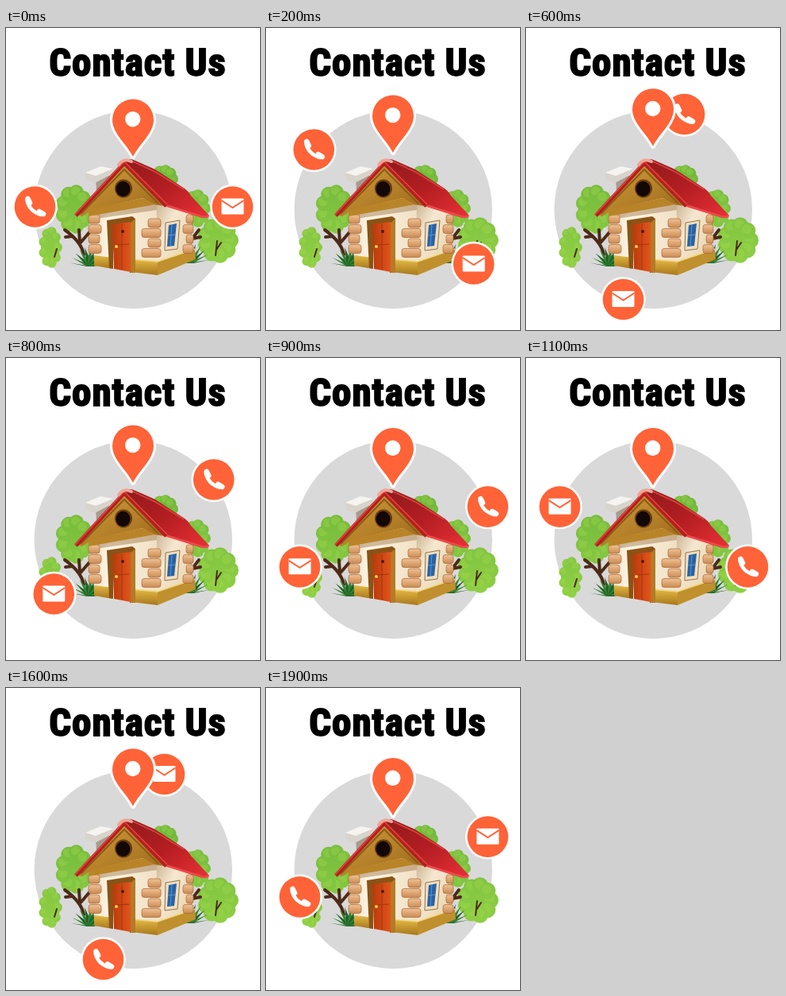
Animation, 320 px wide and 380 px high, one loop 2 s. Source, as an HTML page:

```html
<!DOCTYPE html>
<html lang="en">
<head>
<meta charset="utf-8">
<title>Contact Us</title>
<style>
  html, body { margin: 0; width: 100%; height: 100%; overflow: hidden; background: #fff; }
  svg { display: block; width: 320px; height: 380px; }
  #title {
    font: 900 49px "Roboto Condensed", Roboto, "Open Sans", sans-serif;
    font-stretch: condensed;
    letter-spacing: 1px;
    stroke: #000;
    stroke-width: 1.8px;
  }
</style>
</head>
<body>
<svg viewBox="0 0 320 380">
  <defs>
    <linearGradient id="roof" x1="0" y1="0" x2="1" y2="1">
      <stop offset="0" stop-color="#8f1a1c"/><stop offset=".5" stop-color="#b41e22"/><stop offset="1" stop-color="#ea3137"/>
    </linearGradient>
    <linearGradient id="gable" x1="0" y1="0" x2="1" y2="1">
      <stop offset="0" stop-color="#d3a03c"/><stop offset="1" stop-color="#9a6519"/>
    </linearGradient>
    <linearGradient id="front" x1="0" y1="0" x2="1" y2="0">
      <stop offset="0" stop-color="#e9dcc6"/><stop offset=".3" stop-color="#fff6e3"/><stop offset="1" stop-color="#f0dfc4"/>
    </linearGradient>
    <linearGradient id="side" x1="0" y1="0" x2="1" y2="1">
      <stop offset="0" stop-color="#c9b190"/><stop offset=".35" stop-color="#f5e8d0"/><stop offset="1" stop-color="#e6cfa6"/>
    </linearGradient>
    <linearGradient id="door" x1="0" y1="0" x2="1" y2="0">
      <stop offset="0" stop-color="#b83a0b"/><stop offset="1" stop-color="#e2541c"/>
    </linearGradient>
    <linearGradient id="base" x1="0" y1="0" x2="0" y2="1">
      <stop offset="0" stop-color="#e3b945"/><stop offset="1" stop-color="#a8771c"/>
    </linearGradient>
    <linearGradient id="brick" x1="0" y1="0" x2="0" y2="1">
      <stop offset="0" stop-color="#f0c294"/><stop offset="1" stop-color="#cb8a52"/>
    </linearGradient>
    <linearGradient id="leaf" gradientUnits="userSpaceOnUse" x1="0" y1="180" x2="0" y2="300">
      <stop offset="0" stop-color="#72b83c"/><stop offset="1" stop-color="#90d044"/>
    </linearGradient>
  </defs>

  <text id="title" x="166" y="59.500" text-anchor="middle">Contact Us</text>
  <circle cx="160.3" cy="228.5" r="124.7" fill="#d9d9d9"/>

  <g id="trees" fill="url(#leaf)"></g>
  <g fill="none" stroke="#4d2a18" stroke-linecap="round" stroke-linejoin="round">
    <path d="M98 285Q95 269 74 254M93 270L92 254M84 262L75 263M94 270L106 256" stroke-width="4"/>
    <path d="M228 283Q232 267 243 254M232 269L231 253M235 265L245 263" stroke-width="4"/>
    <path d="M264 286L266 268M265 279L271 270M61 288L64 278" stroke-width="2"/>
  </g>
  <g id="grass"></g>

  <!-- walls -->
  <path d="M104 225L148 190L191 220L190 310L112 299Z" fill="url(#front)"/>
  <path d="M190 218L233 233L234 290L189 305Z" fill="url(#side)"/>
  <path d="M104 232L190 220V229L106 241Z" fill="#8a6238" opacity=".4"/>
  <path d="M111 286L134 289V303L111 299Z" fill="url(#base)"/>
  <path d="M158 291L191 294V311L158 307Z" fill="url(#base)"/>
  <path d="M191 294L238 278L239 291L191 311Z" fill="#bf902d"/>
  <path d="M158 291L191 294L238 278" fill="none" stroke="#f2d577" stroke-width="1.5"/>
  <g id="bricks" fill="url(#brick)" stroke="#a8683a" stroke-width=".7"></g>

  <!-- door and window -->
  <path d="M127 242L159 237L163 240V308H156V247L135 249V303L130 302Z" fill="#8a5316"/>
  <path d="M157 245L163 240V308H157Z" fill="#b57a26"/>
  <path d="M134 247L157 244V307L136 303Z" fill="url(#door)"/>
  <path d="M146 247V304M139 273L155 272" stroke="#a5350b"/>
  <circle cx="139" cy="275" r="2" fill="#f6cc55"/>
  <circle cx="147" cy="256" r="2" fill="#4a1c09"/>
  <path d="M201 245L219 242L216 278L200 280Z" fill="#efdfc0" stroke="#94744a"/>
  <path d="M205 248L215 246L212 274L203 275Z" fill="#2862a5"/>
  <path d="M209 247L207 275M204 261L213 260" stroke="#5d94c9" stroke-width="1"/>

  <!-- chimney -->
  <path d="M113 188L130 180V192L114 206Z" fill="#a59c90"/>
  <path d="M100 182L119 174L135 177L133 184L112 195L101 191Z" fill="#d8d4cb"/>
  <path d="M100 182L119 174L135 177L113 186Z" fill="#f5f4f0"/>

  <!-- roof -->
  <path d="M148 167Q155 163 163 167L188 178L222 200Q229 204 233 211L256 236Q252 241 244 238L200 224Z" fill="url(#roof)"/>
  <path d="M160 168L188 181L224 203" fill="none" stroke="#d8433d" stroke-width="1.5"/>
  <path d="M201 223L246 237Q252 239 255 236" fill="none" stroke="#f0484a" stroke-width="2.5"/>
  <path d="M88 235L149 172L200 224L186 222L172 214L108 229L96 237Z" fill="url(#gable)"/>
  <path d="M104 229L172 214L188 222L104 237Z" fill="#b98428"/>
  <path d="M94 234L149 178L192 221" fill="none" stroke="#8d5b17" stroke-width="2"/>
  <path d="M88 236L149 170L202 224" fill="none" stroke="#b41f1f" stroke-width="5" stroke-linejoin="round"/>
  <path d="M87 235L149 168L203 222" fill="none" stroke="#e2483c" stroke-width="1.5"/>
  <path d="M142 172Q148 163 158 168" fill="none" stroke="#f0a596" stroke-width="4" stroke-linecap="round"/>
  <ellipse cx="148" cy="202" rx="11" ry="11.5" fill="#6b3c10"/>
  <ellipse cx="147.500" cy="202.500" rx="9" ry="9.700" fill="#120805"/>

  <g id="phone" class="badge">
    <circle r="28.300" fill="#fff"/><circle r="25.800" fill="#ff6337"/>
    <g fill="none" stroke="#fff" stroke-linecap="round">
      <path d="M-10 -8Q-7 6 8 10" stroke-width="4.500"/>
      <path d="M-9 -10L-6.500 -5M5.500 6L10.500 9" stroke-width="6.500"/>
    </g>
  </g>
  <g id="mail" class="badge">
    <circle r="28.300" fill="#fff"/><circle r="25.800" fill="#ff6337"/>
    <rect x="-14" y="-10.500" width="28" height="20" rx="1" fill="#fff"/>
    <path d="M-14 -8L0 1L14 -8" fill="none" stroke="#ff6337" stroke-width="2"/>
  </g>
  <g id="pin">
    <path d="M160 162C153 147 134 133 134 115.500A26 26 0 0 1 186 115.500C186 133 167 147 160 162Z" fill="#ff6337" stroke="#fff" stroke-width="6" stroke-linejoin="round" paint-order="stroke"/>
    <circle cx="159.700" cy="114.700" r="9.700" fill="#fff"/>
  </g>
</svg>
<script>
const TAU = 2 * Math.PI;
const $ = id => document.getElementById(id);
const draw = (parent, tag, attrs) => {
  const node = document.createElementNS("http://www.w3.org/2000/svg", tag);
  for (const key in attrs) node.setAttribute(key, attrs[key]);
  $(parent).append(node);
};

// An ellipse with round bumps along its rim and lighter patches on top
function foliage(cx, cy, rx, ry, bumps = 9) {
  const bump = Math.min(rx, ry) * .4;
  draw("trees", "ellipse", { cx, cy, rx: rx * .8, ry: ry * .8 });
  for (let i = 0; i < bumps; i++) {
    const angle = i / bumps * TAU;
    const x = cx + (rx - bump) * Math.cos(angle), y = cy + (ry - bump) * Math.sin(angle);
    draw("trees", "circle", { cx: x, cy: y, r: bump });
    draw("trees", "circle", { cx: x - 1, cy: y - 2, r: bump * .6, fill: "#a2d94f", opacity: .35 });
  }
}
foliage(86, 228, 24, 31);
foliage(56, 276, 15, 26);
foliage(199, 190, 18, 18);
foliage(240, 227, 18, 24);
foliage(267, 267, 26, 29);

function tuft(x, y, size) {
  for (let i = -5; i <= 5; i++) {
    const lean = i * .28;
    draw("grass", "path", {
      d: `M${x - 4} ${y}L${x + Math.sin(lean) * size} ${y - Math.cos(lean) * size}L${x + 4} ${y}Z`,
      fill: i % 2 ? "#1f5f2a" : "#34832f"
    });
  }
}
tuft(106, 300, 25);
tuft(232, 296, 25);

// A column of corner stones; every other one is longer by `extra`
function stones(x, y, count, width, extra, step = 12.5) {
  for (let i = 0; i < count; i++) {
    const more = i % 2 * extra;
    draw("bricks", "rect", {
      x: x - Math.max(more, 0), y: y + i * step, width: width + Math.abs(more), height: step - 1.5, rx: 3
    });
  }
}
stones(104, 235, 4, 14, -2);
stones(179, 240, 4, 16, 8);
stones(227, 235, 4, 9, 4);

const STEP = 100, STEPS = 20;
const place = (id, x, y) => $(id).setAttribute("transform", `translate(${x.toFixed(2)} ${y.toFixed(2)})`);
const orbit = (id, turn) => place(id, 161 + 124.5 * Math.cos(turn * TAU), 225 + 122.5 * Math.sin(turn * TAU));

const start = performance.now();
function frame() {
  const step = Math.floor((performance.now() - start) / STEP) % STEPS;
  const turn = step / STEPS;
  orbit("phone", turn + .5);
  orbit("mail", turn);
  place("pin", 0, -7.3 * (1 - Math.cos(turn * 2 * TAU)));
  requestAnimationFrame(frame);
}
frame();
</script>
</body>
</html>
```
